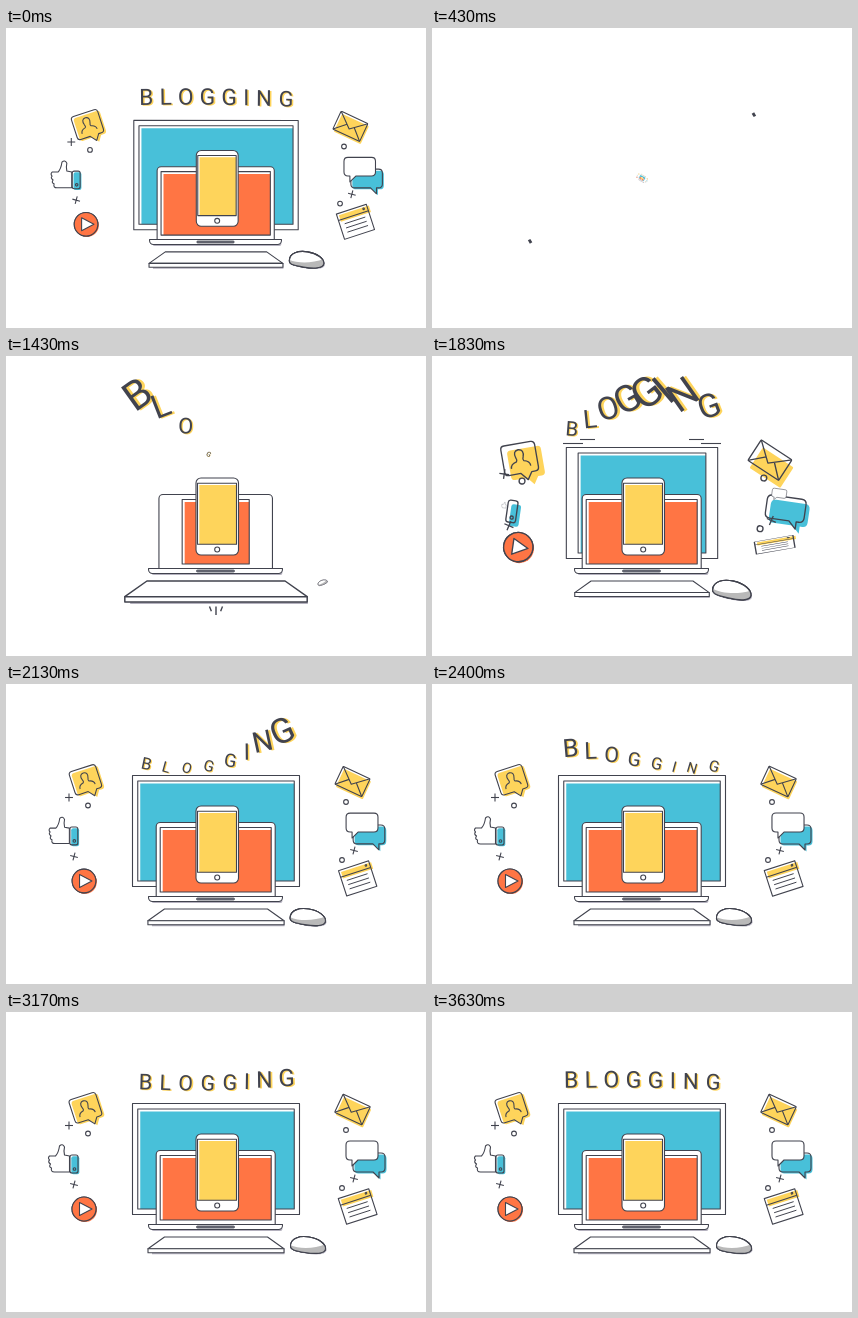
Animation of 420x300 px, one loop 3660 ms. Source, as an HTML page with a canvas:

```html
<!DOCTYPE html>
<html lang="en">
<head>
<meta charset="utf-8">
<title>Blogging</title>
<style>
html, body { margin: 0; width: 100%; height: 100%; overflow: hidden; background: #fff; }
canvas { display: block; width: 420px; height: 300px; }
</style>
</head>
<body>
<canvas id="stage"></canvas>
<script>
const W = 420, H = 300, LOOP = 3660, CX = 210, CY = 150;
const INK = '#41434e', YELLOW = '#fed45b', BLUE = '#48c0d9', ORANGE = '#ff7544', SHADE = '#b4b1be';
const canvas = document.getElementById('stage');
const c = canvas.getContext('2d');
const dpr = window.devicePixelRatio || 1;
canvas.width = W * dpr;
canvas.height = H * dpr;

const clamp = v => Math.max(0, Math.min(1, v));
const easeOut = (t, start, span) => 1 - (1 - clamp((t - start) / span)) ** 3;

// Grows from 0 to 1 during rise, then overshoots and settles.
function pop(t, start, rise, over) {
  const s = (t - start) / rise - 1;
  return s < 0 ? Math.max(0, s + 1) : 1 + over * Math.exp(-s) * Math.sin(Math.PI * s);
}

// Arrives at 0 from -1 in 100 ms, then rings out slowly.
function spring(u) {
  const s = (u - 100) / 1000;
  return s < 0 ? s * 10 : 1.36 * Math.exp(-1.8 * s) * Math.sin(2 * Math.PI * s);
}

function at(x, y, sx, sy, deg, draw) {
  if (Math.min(sx, sy) < 0.005) return;
  c.save();
  c.translate(x, y);
  c.rotate(deg * Math.PI / 180);
  c.scale(sx, sy);
  draw();
  c.restore();
}

function paint(path, fill, stroke = INK, width = 1.1) {
  if (fill) { c.fillStyle = fill; c.fill(path); }
  if (stroke) { c.strokeStyle = stroke; c.lineWidth = width; c.stroke(path); }
}

const svg = d => new Path2D(d);

function box(x, y, w, h, r = 0) {
  const p = new Path2D();
  p.roundRect(x, y, w, h, r);
  return p;
}

function disc(x, y, r) {
  const p = new Path2D();
  p.arc(x, y, r, 0, 7);
  return p;
}

function seg(x1, y1, x2, y2, width) {
  paint(svg(`M${x1} ${y1}L${x2} ${y2}`), null, INK, width);
}

// Outline with its colour slightly out of register.
function offsetFill(path, fill, d) {
  paint(path, '#fff', null);
  c.save();
  c.translate(d, d);
  paint(path, fill, null);
  c.restore();
  paint(path, null);
}

// Display whose colour leaves a white edge at the left and top.
function screen(x, y, w, h, gap, fill) {
  if (w < 2 * gap) return;
  paint(box(x, y, w, h), '#fff', null);
  paint(box(x + gap, y + gap, w - gap, h - gap), fill, null);
  paint(box(x, y, w, h), null);
}

function monitor(t) {
  const w = 167 * easeOut(t, 1640, 350), s = 156.5 * easeOut(t, 1680, 350);
  if (w < 1) return;
  at(CX, 202, 1, easeOut(t, 1640, 120), 0, () => {
    paint(box(-w / 2, -110.5, w, 111), '#fff');
    screen(-s / 2, -105, s, 100, 2.5, BLUE);
  });
  if (t > 1770 && t < 1890)
    for (const side of [-1, 1]) {
      seg(CX + side * 47, 83.5, CX + side * 62, 83.5);
      seg(CX + side * 59, 87.5, CX + side * 79, 87.5);
    }
}

function laptop(t) {
  const w = 119 * easeOut(t, 950, 750), s = 111 * easeOut(t, 1330, 380);
  at(209.7, 212.5, 1, pop(t, 950, 90, 0.05), 0, () => {
    paint(box(-w / 2, -74, w, 74, [4, 4, 0, 0]), '#fff');
    screen(-s / 2, -69, s, 64.5, 2.5, ORANGE);
  });
  at(209.5, 212.5, pop(t, 870, 90, 0.11), 1, 0, () => {
    paint(box(-64, 2, 131, 4.5, 3), SHADE, null);
    paint(box(-67, 0, 134, 5, [0, 0, 4, 4]), '#fff');
    paint(box(-19, 1.5, 38, 2, 1), '#777984', INK, 0.8);
  });
}

function phone(t) {
  const s = pop(t, 670, 80, 0.45);
  at(211, 160.5, s, s, 0, () => {
    paint(box(-21, -38.5, 42.5, 77, 5), '#fff');
    screen(-19.5, -33.3, 39, 61, 1.8, YELLOW);
    paint(disc(0.2, 33, 2.5), '#fff');
  });
}

function keyboard(t) {
  const s = pop(t, 1200, 130, 1.15);
  at(CX, 225, s, s, 0, () => {
    paint(box(-64, 12, 132.5, 5.2), SHADE, null);
    paint(svg('M-51.5 0H51.5L68 11.7H-68Z'), '#fff');
    paint(box(-68, 11.7, 136, 4), '#fff');
  });
  if (t > 1320 && t < 1500) {
    const k = Math.sin((t - 1320) / 180 * Math.PI);
    for (const i of [-1, 0, 1])
      seg(CX + 6.5 * i, 250.5, CX + (6.5 - 2 * k) * i, 250.5 + (i ? 5 : 9) * k, 1.4);
  }
}

const mouseBody = svg('M-17.5 1C-17.5 -7 -8 -9.5 1 -8C11 -6.5 18 -1 17.5 4C17 9 7 9 -3 7.5C-12 6 -17.5 5 -17.5 1Z');

function mouse(t) {
  const s = pop(t, 1395, 130, 1.2), lag = 1 - s;
  at(302 + 20 * lag, 233 - 9 * lag, s, s, -40 * lag, () => {
    offsetFill(mouseBody, SHADE, 1.1);
    paint(mouseBody, '#fff');
    c.save();
    c.clip(mouseBody);
    paint(svg('M-18 0C-9 4 6 4 18 -1V10H-18Z'), '#b9b9b9', null);
    c.restore();
    paint(mouseBody, null);
  });
}

const bubble = svg('M-11 -12.5H11Q14 -12.5 14 -9.5V9Q14 12 11 12H8L4 18L-1 12H-11Q-14 12 -14 9V-9.5Q-14 -12.5 -11 -12.5Z');
const talk = svg('M-12 -10H12Q16 -10 16 -6V5Q16 9 12 9H-4L-10 15V9H-12Q-16 9 -16 5V-6Q-16 -10 -12 -10Z');
const talkBack = svg('M12 -10H-12Q-16 -10 -16 -6V5Q-16 9 -12 9H4L10 15V9H12Q16 9 16 5V-6Q16 -10 12 -10Z');
const hand = svg('M1 -4L-4 -5Q-5 -9 -4 -13Q-6 -17 -9 -14Q-10 -7 -13 -4H-19Q-21 -2 -19 0Q-21 2 -18 4Q-20 7 -17 8Q-18 12 -14 12H1Z');

function profile(t, slip) {
  offsetFill(bubble, YELLOW, 2 * slip);
  paint(svg('M-8 7Q-8 3 -3 2Q-2 1 -3 -1Q-5 -7 0 -7.5Q5 -7 3 -1Q2 1 3 2Q8 3 8 7'), null);
}

function thumb(t, slip) {
  const k = pop(t, 1810, 120, 0.15);
  at(8, 0, k, k, 0, () => paint(hand, '#fff'));
  offsetFill(box(9.5, -5, 8, 18, 2), BLUE, 1.3 * slip);
  paint(disc(14, 9, 1.3), null);
}

function play() {
  offsetFill(disc(0, 0, 12), ORANGE, 1);
  paint(disc(0, 0, 12), ORANGE);
  paint(svg('M-4.5 -6.5L8 0L-4.5 6.5Z'), '#fff');
}

function envelope(t, slip) {
  offsetFill(box(-15, -10, 30, 20, 1), YELLOW, 2 * slip);
  paint(svg('M-15 -10L0 3L15 -10M-15 10L-4 -0.5M15 10L4 -0.5'), null);
}

function chat(t, slip) {
  const k = pop(t, 1790, 110, 0.2);
  at(4, 5, 1, 1, 0, () => offsetFill(talkBack, BLUE, 1.5 * slip));
  at(-3, -7, k, k, 0, () => paint(talk, '#fff'));
}

function page(t) {
  const k = easeOut(t, 1790, 280);
  at(0, 0, 1, k, 0, () => {
    paint(box(-16, -13, 32, 27), '#fff', null);
    paint(box(-14, -11, 32, 7), YELLOW, null);
    paint(box(-16, -13, 32, 27), null);
    seg(-16, -6, 16, -6);
    paint(disc(12, -9.5, 0.8), null);
    for (let y = -1; y < 10; y += 4.5) seg(-11, y, 11, y, 0.9);
  });
}

function plus() { seg(-4, 0, 4, 0); seg(0, -4, 0, 4); }
function dot() { paint(disc(0, 0, 2.4), null); }

// Resting place and angle of each icon
const icons = [
  [profile, 79.5, 96, -18], [thumb, 54.5, 148, 0], [play, 78, 197, 0],
  [plus, 63, 113.5, 0], [plus, 68, 172.5, 15], [dot, 82, 121.5, 0],
  [envelope, 346.5, 97.5, 25], [chat, 359, 146, 0], [page, 351.5, 194, -18],
  [plus, 348, 166.5, 15], [dot, 340, 118, 0], [dot, 336, 176, 0]
];

function drawIcons(t) {
  const s = pop(t, 1690, 100, 0.35);
  const lag = 1 - easeOut(t, 1690, 440);
  for (const [shape, x, y, deg] of icons)
    at(x + (CX - x) * 0.2 * lag, y + (CY - y) * 0.4 * lag, s, s, deg + 26 * lag, () => shape(t, 1 + 4 * lag));
}

function title(t) {
  c.font = '400 22.6px Roboto, Arial, sans-serif';
  c.textAlign = 'center';
  let x = 132.2;
  [...'BLOGGING'].forEach((ch, i) => {
    const w = c.measureText(ch).width;
    const u = t - 1200 - i * 67;
    if (u > 0) {
      const e = spring(u);
      at(x + w / 2, 76.3 - 34 * e, 1 + e, 1 + e, -45 * e, () => {
        c.fillStyle = YELLOW;
        c.fillText(ch, 1.5, 0.8);
        c.fillStyle = INK;
        c.fillText(ch, 0, 0);
      });
    }
    x += w + 6.6;
  });
}

// Six rays fly out; one opposite pair trails the others.
function burst(t) {
  for (let i = 0; i < 6; i++) {
    const u = i % 3 ? t + 50 : t;
    const head = clamp((u - 130) / 200), tail = clamp((u - 216) / 222);
    if (head <= 0 || tail >= 1) continue;
    const a = (i * 60 - 29.5) * Math.PI / 180;
    const [x0, y0, x1, y1] = [tail, head].flatMap(p => {
      const r = 40 + 90 * p;
      return [CX + r * Math.cos(a), CY + r * Math.sin(a)];
    });
    seg(x0, y0, x1, y1, 4);
  }
}

function scene(t) {
  monitor(t);
  laptop(t);
  phone(t);
  keyboard(t);
  mouse(t);
  drawIcons(t);
  title(t);
}

function render(t) {
  c.setTransform(dpr, 0, 0, dpr, 0, 0);
  c.fillStyle = '#fff';
  c.fillRect(0, 0, W, H);
  c.lineJoin = 'round';
  if (t < 530) {
    const p = clamp(((t + 33) / 475) ** 1.58);
    at(CX, CY, 1 - p, 1 - p, 32 * p * p, () => {
      c.translate(-CX, -CY);
      scene(LOOP + t);
    });
    burst(t);
  } else {
    scene(t);
  }
}

const start = performance.now();
function tick() {
  render((performance.now() - start) % LOOP);
  requestAnimationFrame(tick);
}
tick();
</script>
</body>
</html>
```
